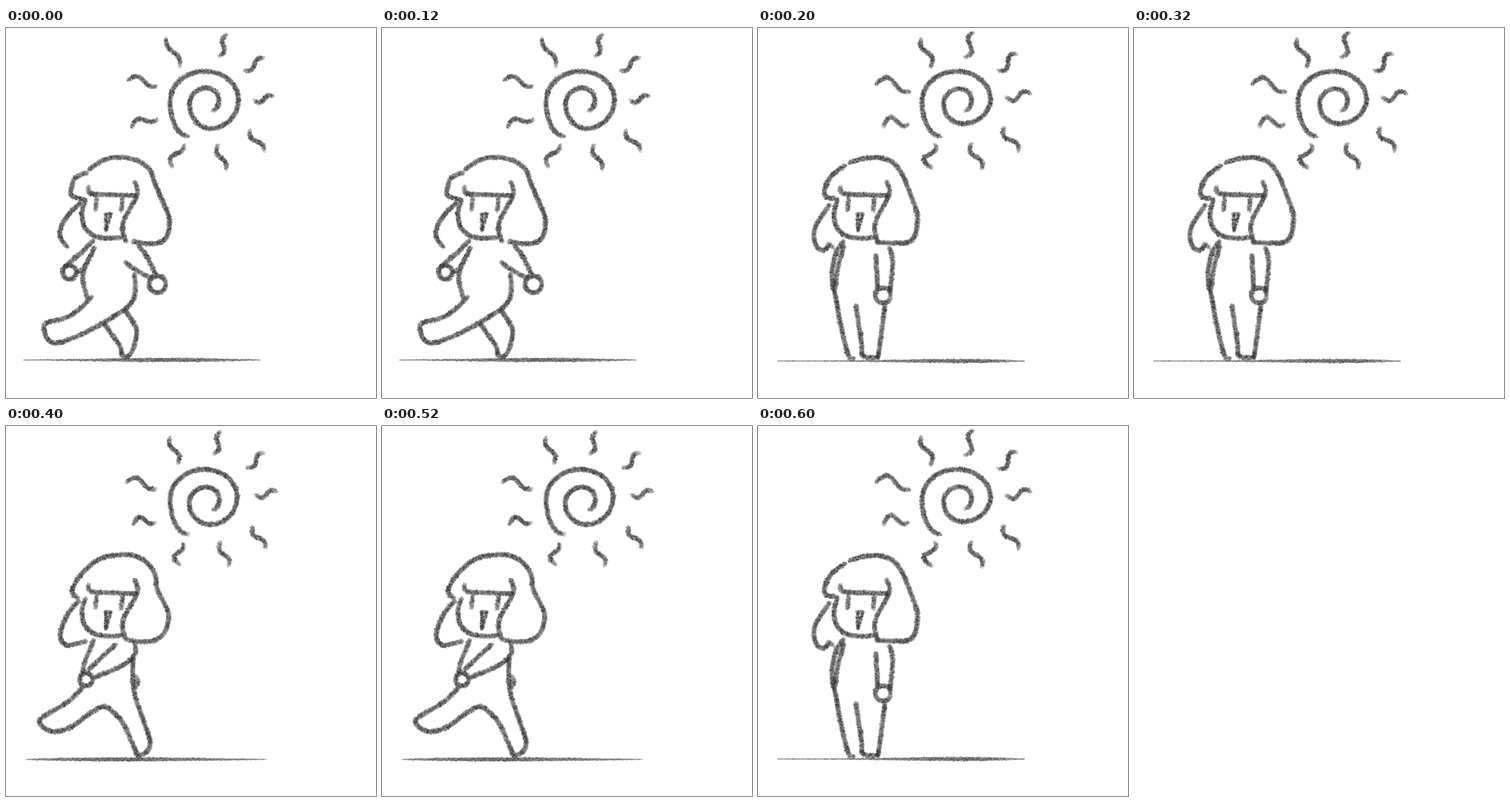
An HTML page with a canvas that plays this animation: 530 px wide and 530 px high, repeating every 0.8 s.

```html
<!DOCTYPE html>
<html lang="en">
<head>
<meta charset="utf-8">
<title>Walk in the sun</title>
<style>
html, body { margin: 0; width: 100%; height: 100%; overflow: hidden; background: #fff; }
canvas { display: block; width: 530px; height: 530px; }
</style>
</head>
<body>
<canvas id="stage" width="530" height="530"></canvas>
<script>
const SIZE = 530, STEP = 200, TAU = Math.PI * 2;

// Strokes are runs of "x,y" key points, separated by "|".
const FACE = '114,247 109,264 112,284 125,297 145,301 167,300|130,243 128,261|167,243 165,262' +
  '|118,227 122,237 155,239 187,240|184,220 188,238 170,273 167,290 172,306';
const MOUTH = '142,266 151,266|150,267 143,291|143,267 143,290';

// Outer and inner end of every ray; the wave between them follows a rule.
const RAYS_SHORT = '229,15 249,55|315,10 306,40|368,43 342,61|382,98 356,104|370,176 349,147|315,203 303,168|238,199 255,168|180,142 217,131|175,75 215,84';
const RAYS_LONG = '234,15 247,56|308,6 297,42|370,37 344,61|390,94 356,99|373,176 352,143|320,202 306,165|248,200 254,167|180,141 216,138|169,80 217,91';

const strideOut = {
  seed: 11,
  ground: { x0: 25, x1: 363, y: 475.5, peak: 0.6 },
  sun: { right: 333, bottom: 144, x: 284, y: 107, r: 21 },
  rays: RAYS_SHORT, reach: 1, curl: 0.75,
  hair: '119,203 138,190 162,185 188,190 206,203 213,222 225,250 234,275 229,301 210,309 182,306|116,207 100,214 94,228 94,240 114,246|107,250 93,263 81,280 77,298 88,314',
  hands: [[91, 350, 10], [217, 367, 12]],
  body: '125,304 112,318 97,331 86,340|102,350 112,343 127,314|112,347 110,362 117,389|123,385 108,400 88,414 58,423 55,433 60,446 74,451 112,437 158,411 176,398 185,380 184,352|190,312 202,328 214,352|170,335 185,346 206,358|140,423 163,455 166,468 174,471 181,462 187,440 184,424 170,404'
};

const passing = {
  seed: 23,
  ground: { x0: 28, x1: 381, y: 477, peak: 0.74 },
  sun: { right: 333, bottom: 137, x: 286, y: 107, r: 20 },
  rays: RAYS_LONG, reach: 1, curl: 1.1,
  hair: '131,193 152,187 176,186 195,194 207,211 216,232 228,268 225,296 215,307 190,308 169,307|125,197 107,210 97,227 97,241 114,245|103,253 91,270 81,288 81,306 88,317 97,317 101,310 108,315',
  hands: [[179, 383, 11]],
  body: '123,305 112,322 106,350 108,376|123,312 114,345 110,376|110,378 119,428 130,470 138,473|140,397 148,450 151,470 172,472|182,397 172,472|188,314 193,335 189,378|169,325 171,374'
};

const strideBack = {
  seed: 37,
  ground: { x0: 29, x1: 372, y: 477.5, peak: 0.4 },
  sun: { right: 331, bottom: 141, x: 284, y: 109, r: 21.5 },
  rays: RAYS_LONG, reach: 0.88, curl: 0.85,
  hair: '103,247 95,238 100,223 114,206 133,191 157,185 180,185 200,194 213,212 217,235 232,266 229,292 215,306 195,309 175,307|105,250 90,267 80,288 78,304 86,314 100,312 115,308',
  hands: [[115, 363, 9.5]],
  body: '126,306 112,341 110,353|157,313 118,349|185,312 184,328 165,344 127,360|182,333 183,378 198,425 206,450 203,465 190,473|186,358 189,367 185,375|189,473 170,430 155,411 140,402 120,412 95,430 72,438 55,433 48,424 54,416 90,394 110,374'
};

function seeded(seed) {
  let s = seed * 7919;
  return () => {
    s = (s + 0x6D2B79F5) | 0;
    let t = Math.imul(s ^ (s >>> 15), 1 | s);
    t = (t + Math.imul(t ^ (t >>> 7), 61 | t)) ^ t;
    return ((t ^ (t >>> 14)) >>> 0) / 4294967296;
  };
}

const parse = run => run.split('|').map(s => s.split(' ').map(p => p.split(',').map(Number)));
const range = (n, f) => Array.from({ length: n + 1 }, (_, i) => f(i / n));

// Quarter ellipses joined at the extremes of the coil.
function coil({ right, bottom, x, y, r }) {
  const ends = [[261, 155], [235, 105], [285, 62], [right, 102], [293, bottom],
    [x - r, y + 2], [x + 3, y - r], [x + r, y - 4], [x + r - 9, y + 11]];
  return ends.slice(1).flatMap(([qx, qy], i) => {
    const [px, py] = ends[i];
    return range(8, t => {
      const s = Math.sin(t * TAU / 4), c = 1 - Math.cos(t * TAU / 4);
      const [u, v] = i % 2 ? [c, s] : [s, c];
      return [px + (qx - px) * u, py + (qy - py) * v];
    }).slice(i ? 1 : 0);
  });
}

// An S-shaped wave; the last three rays lean the other way.
function ray([[ax, ay], [bx, by]], i, reach, curl) {
  const dx = bx - ax, dy = by - ay, len = Math.hypot(dx, dy);
  const [wave, bow] = i < 6 ? [5, -1.5] : [-6, -7];
  return range(12, t => {
    const k = 0.5 + (t - 0.5) * reach;
    const off = curl * (wave * Math.sin(TAU * t) + bow * Math.sin(Math.PI * t));
    return [ax + dx * k - dy / len * off, ay + dy * k + dx / len * off];
  });
}

const ring = ([x, y, r]) => range(16, t => [x + r * Math.cos(t * TAU), y + r * Math.sin(t * TAU)]);

const spline = (a, b, c, d, t) =>
  0.5 * (2 * b + (c - a) * t + (2 * a - 5 * b + 4 * c - d) * t * t + (3 * b - a - 3 * c + d) * t * t * t);

// Points about one pixel apart on a smooth curve.
function trace(pts) {
  const at = i => pts[Math.max(0, Math.min(pts.length - 1, i))];
  const out = [];
  for (let i = 0; i < pts.length - 1; i++) {
    const [a, b, c, d] = [at(i - 1), at(i), at(i + 1), at(i + 2)];
    const n = Math.max(1, Math.round(Math.hypot(c[0] - b[0], c[1] - b[1])));
    for (let k = 0; k < n; k++) {
      out.push([0, 1].map(j => spline(a[j], b[j], c[j], d[j], k / n)));
    }
  }
  return [...out, at(pts.length - 1)];
}

function dot(g, x, y, r, shade, alpha) {
  g.fillStyle = `rgba(${shade},${shade},${shade},${alpha})`;
  g.beginPath();
  g.arc(x, y, r, 0, TAU);
  g.fill();
}

function crayon(g, rand, pts, radius) {
  const line = trace(pts);
  let clump = 0.6;
  line.forEach(([x, y], i) => {
    const end = Math.min(i, line.length - 1 - i);
    const press = Math.min(1, 0.6 + end / 20);
    const r = radius * Math.min(1, 0.8 + end / 25);
    const scatter = d => {
      const a = rand() * TAU, m = Math.sqrt(rand()) * d;
      return [x + Math.cos(a) * m, y + Math.sin(a) * m];
    };
    if (i % 4 === 0) {
      clump = 0.3 + rand() * 0.8;
      dot(g, ...scatter(1.6), 2.1, 40, 0.35 * rand() * press);
    }
    dot(g, ...scatter(0.6), r * 0.88, 75, 0.11 * press);
    for (let k = 0; k < 5; k++) {
      dot(g, ...scatter(r), 0.6 + rand() * 0.7, 45, 0.36 * clump * press * (0.4 + rand()));
    }
  });
}

function drawGround(g, rand, { x0, x1, y, peak }) {
  const bend = Math.log(0.5) / Math.log(peak);
  for (let x = x0; x <= x1; x++) {
    const swell = Math.max(0, Math.sin(Math.PI * Math.pow((x - x0) / (x1 - x0), bend)));
    const half = 0.5 + 2.8 * swell, press = 0.35 + 0.65 * swell;
    g.fillStyle = `rgba(70,70,70,${0.6 * press})`;
    g.fillRect(x, y - half * 0.75, 1, half * 1.5);
    for (let k = 0; k < 5; k++) {
      dot(g, x + rand(), y + (rand() * 2 - 1) * half, 0.4 + rand() * 0.6, 40, (0.12 + rand() * 0.35) * press);
    }
  }
}

function render(pose) {
  const sheet = document.createElement('canvas');
  sheet.width = sheet.height = SIZE;
  const g = sheet.getContext('2d');
  g.fillStyle = '#fff';
  g.fillRect(0, 0, SIZE, SIZE);
  const rand = seeded(pose.seed);
  const ink = (strokes, radius) => strokes.forEach(pts => crayon(g, rand, pts, radius));
  drawGround(g, rand, pose.ground);
  ink([coil(pose.sun)], 4.1);
  ink(parse(pose.rays).map((ends, i) => ray(ends, i, pose.reach, pose.curl)), 3.9);
  ink([...parse(pose.hair), ...parse(FACE), ...parse(pose.body), ...pose.hands.map(ring)], 4.1);
  ink(parse(MOUTH), 3);
  return sheet;
}

const [out, mid, back] = [strideOut, passing, strideBack].map(render);
const cycle = [out, mid, back, mid];
const view = document.getElementById('stage').getContext('2d');
const start = performance.now();

function tick(now) {
  const i = Math.floor(Math.max(0, now - start) / STEP) % cycle.length;
  view.drawImage(cycle[i], 0, 0);
  requestAnimationFrame(tick);
}
tick(start);
</script>
</body>
</html>
```
